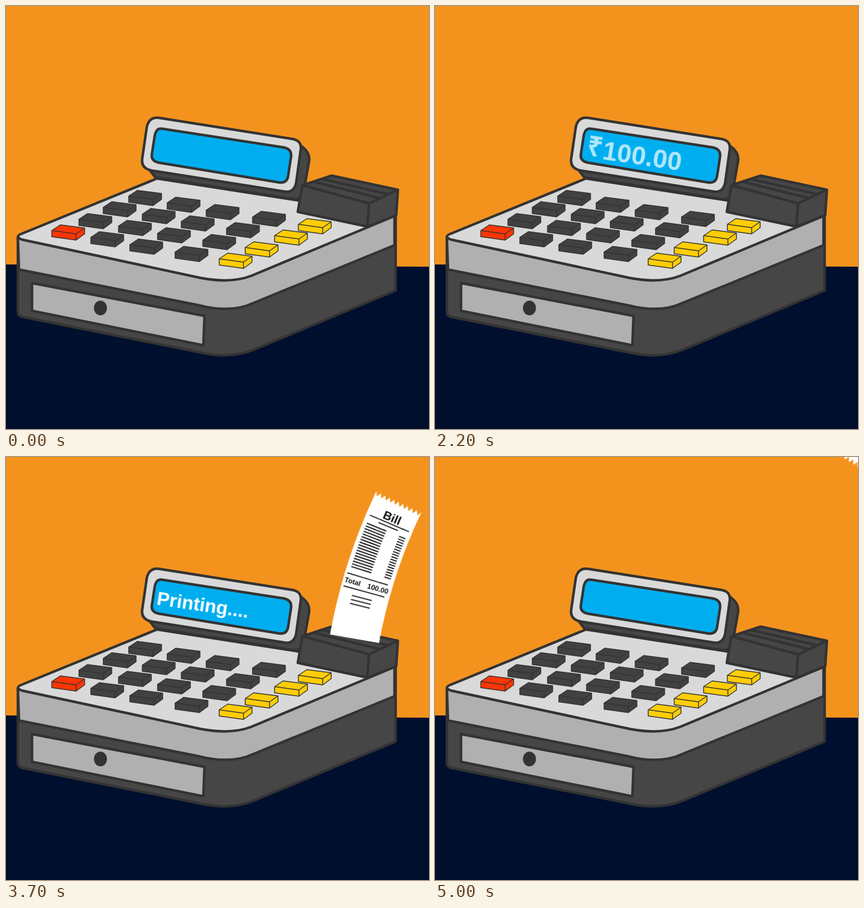
An HTML page without scripts for the animation above (5.2 s loop, 748 by 748 pixels).

```html
<!DOCTYPE html>
<html lang="en">
<head>
<meta charset="utf-8">
<title>Cash register</title>
<style>
  html, body { margin: 0; width: 100%; height: 100%; overflow: hidden; background: #f3931e; }
  svg { display: block; width: 100vw; height: 100vh; }
  text { font-family: "Liberation Sans", Arial, sans-serif; font-weight: bold; }
  .body { stroke: #333; stroke-width: 4.5; stroke-linejoin: round; }
  .dark { fill: #464646; color: #414141; }
  .gray { fill: #b0b0b0; }
  .light { fill: #d9d9d9; }
  .yellow { color: #ffcd05; }
  .red { color: #ff3505; }
  .screen { fill: #fff; }
  .rule { stroke: #111; stroke-width: 1.8; fill: none; }

  .amount, .status, .paper, .press, .type { animation: 5.2s -.02s infinite; }
  .amount { animation-name: amount; }
  .status { animation-name: status; }
  .paper { animation-name: paper; }
  .press { animation-name: press; transform-box: fill-box; transform-origin: center; }
  .type {
    visibility: hidden;
    animation-name: type;
    animation-delay: calc(var(--at) * .1s - 5.22s);
    animation-timing-function: step-end;
  }

  @keyframes type {
    0% { visibility: visible; }
    60%, 100% { visibility: hidden; }
  }
  @keyframes amount {
    0% { opacity: 1; }
    25% { opacity: 1; animation-timing-function: steps(6); }
    36.538% { opacity: .88; animation-timing-function: steps(3); }
    42.308% { opacity: .7; animation-timing-function: steps(2); }
    46.154% { opacity: .45; animation-timing-function: steps(2); }
    50%, 100% { opacity: 0; }
  }
  @keyframes status {
    0% { opacity: 0; }
    50% { opacity: 0; animation-timing-function: steps(8); }
    65.385% { opacity: 1; }
    71.154% { opacity: 1; animation-timing-function: steps(5); }
    80.769% { opacity: .9; animation-timing-function: steps(4); }
    88.462%, 100% { opacity: 0; }
  }
  @keyframes paper {
    0% { transform: rotate(-16.65deg); }
    46.154% { transform: rotate(-16.65deg); animation-timing-function: steps(14); }
    73.077% { transform: rotate(-.37deg); animation-timing-function: steps(1); }
    75% { transform: rotate(0deg); }
    90.385% { transform: rotate(0deg); animation-timing-function: steps(3); }
    96.154%, 100% { transform: rotate(20deg); }
  }
  @keyframes press {
    0% { transform: scale(1); }
    42.308% { transform: scale(1); animation-timing-function: steps(2); }
    46.154% { transform: scale(.9); animation-timing-function: steps(3); }
    51.923%, 100% { transform: scale(1); }
  }
</style>
</head>
<body>
<svg viewBox="0 0 748 748">
  <defs>
    <g id="key" fill="currentColor" stroke="#333" stroke-width="1.5" stroke-linejoin="round">
      <path d="M1 11 16 1 59 6.500V17L44 28 1 22Z"/>
      <path d="M1 11 44 17 59 6.500M44 17V28" fill="none"/>
    </g>
    <path id="teeth" d="M-1010 1V-8l4.4 8 4.4-8 4.4 8 4.4-8 4.4 8 4.4-8 4.4 8 4.4-8 4.4 8 4.4-8 4.4 8 4.4-8 4.4 8 4.4-8 4.4 8 4.4-8 4.4 8 4.4-8 4.4 8 4.4-8V1Z"/>
    <clipPath id="slot"><path d="M540-10H760V346.500L540 308Z"/></clipPath>
  </defs>

  <rect width="748" height="748" fill="#f3931e"/>
  <path d="M0 457 748 461V748H0Z" fill="#000f2e"/>

  <g class="body">
    <path class="dark" d="M21 410V538Q20 548 30 550L350 614Q400 624 440 607L689 503V372L400 440Z"/>
    <path class="gray" d="M21 409 23 466 340 529Q398 544 438 525L687 423V371L400 430Z"/>
    <path class="light" d="M27 403 267 305 512 343 688 371 434 477Q398 491 345 481L28 413Q15 408 27 403Z"/>
    <path class="gray" d="M46 490 351 548 349 600 46 539Z"/>

    <path class="dark" d="M250 285 264 303 504 341Q523 344 526 330L536 274Q538 258 520 246Z"/>
    <path class="light" d="M272 198 506 235Q524 238 521 255L513 313Q509 331 492 328L258 291Q238 287 241 269L249 214Q253 195 272 198Z"/>
    <path fill="#00aeef" d="M276 217 491 250Q506 253 504 267L499 300Q497 314 483 312L270 277Q256 274 258 262L263 229Q266 215 276 217Z"/>

    <g class="dark">
      <path d="M524 317 576 300 693 325 690 370 639 390 516 364Z"/>
      <path d="M524 317 642 349 693 325M642 349 639 390M559 306 676 333M545 311 662 340" fill="none"/>
    </g>
  </g>
  <ellipse cx="167" cy="534" rx="11.5" ry="13" fill="#333"/>

  <g class="dark">
    <use href="#key" x="216" y="325"/><use href="#key" x="284" y="337"/>
    <use href="#key" x="353" y="350"/><use href="#key" x="435" y="362"/>
    <use href="#key" x="171" y="345"/><use href="#key" x="240" y="357"/>
    <use href="#key" x="309" y="370"/><use href="#key" x="389" y="382"/>
    <use href="#key" x="128" y="366"/><use href="#key" x="198" y="378"/>
    <use href="#key" x="267" y="391"/><use href="#key" x="347" y="403"/>
    <use href="#key" x="149" y="398"/><use href="#key" x="218" y="411"/>
    <use href="#key" x="298" y="424"/>
  </g>
  <g class="yellow">
    <use href="#key" x="516" y="375"/><use href="#key" x="474" y="395"/>
    <use href="#key" x="422" y="416"/><use href="#key" x="376" y="436"/>
  </g>
  <g class="press red"><use href="#key" x="80" y="386"/></g>

  <g class="amount screen" transform="translate(266 266.5) rotate(8.5)">
    <text class="type" style="--at:1" y="-3" font-size="47">₹</text>
    <text x="29" font-size="46"><tspan class="type" style="--at:2">1</tspan><tspan class="type" style="--at:3">0</tspan><tspan class="type" style="--at:4">0</tspan><tspan class="type" style="--at:5">.</tspan><tspan class="type" style="--at:6">0</tspan><tspan class="type" style="--at:8">0</tspan></text>
  </g>
  <text class="status screen" transform="translate(265.5 261) rotate(8.3)" font-size="33.5">Printing....</text>

  <!-- The receipt is a strip of a ring that turns about the ring's centre -->
  <g clip-path="url(#slot)">
    <g transform="translate(1566.5 495.5)">
      <g class="paper">
        <path transform="rotate(10.68)" d="M-966 0A966 966 0 0 1-929-265" fill="none" stroke="#fff" stroke-width="88"/>
        <use href="#teeth" transform="rotate(26.58)" fill="#fff"/>
        <use href="#teeth" transform="rotate(10.7) scale(1 -1)" fill="#fff"/>
        <g fill="#111">
          <text transform="rotate(25.22)" x="-965" y="7" font-size="21" text-anchor="middle">Bill</text>
          <g transform="rotate(17.62)" font-size="12.5">
            <text x="-1007" y="4">Total</text>
            <text x="-927" y="4" text-anchor="end">100.00</text>
          </g>
        </g>
        <g class="rule">
          <path transform="rotate(24.58)" d="M-1003 0h75"/>
          <path transform="rotate(24.23)" d="M-984 0h37"/>
          <g transform="rotate(19)" stroke-dasharray=".4 .6">
            <path d="M-984 0A984 984 0 0 1-980.6-81.8" stroke-width="37" pathLength="16.4"/>
            <path d="M-935 0A935 935 0 0 1-931.8-77.7" stroke-width="12" pathLength="16.4"/>
          </g>
          <path transform="rotate(18.33)" d="M-1006 0h75"/>
          <path transform="rotate(16.97)" d="M-1006 0h75"/>
          <path transform="rotate(16.25)" d="M-987 0h36"/>
          <path transform="rotate(15.83)" d="M-987 0h36"/>
          <path transform="rotate(15.41)" d="M-987 0h36"/>
        </g>
      </g>
    </g>
  </g>
</svg>
</body>
</html>
```
